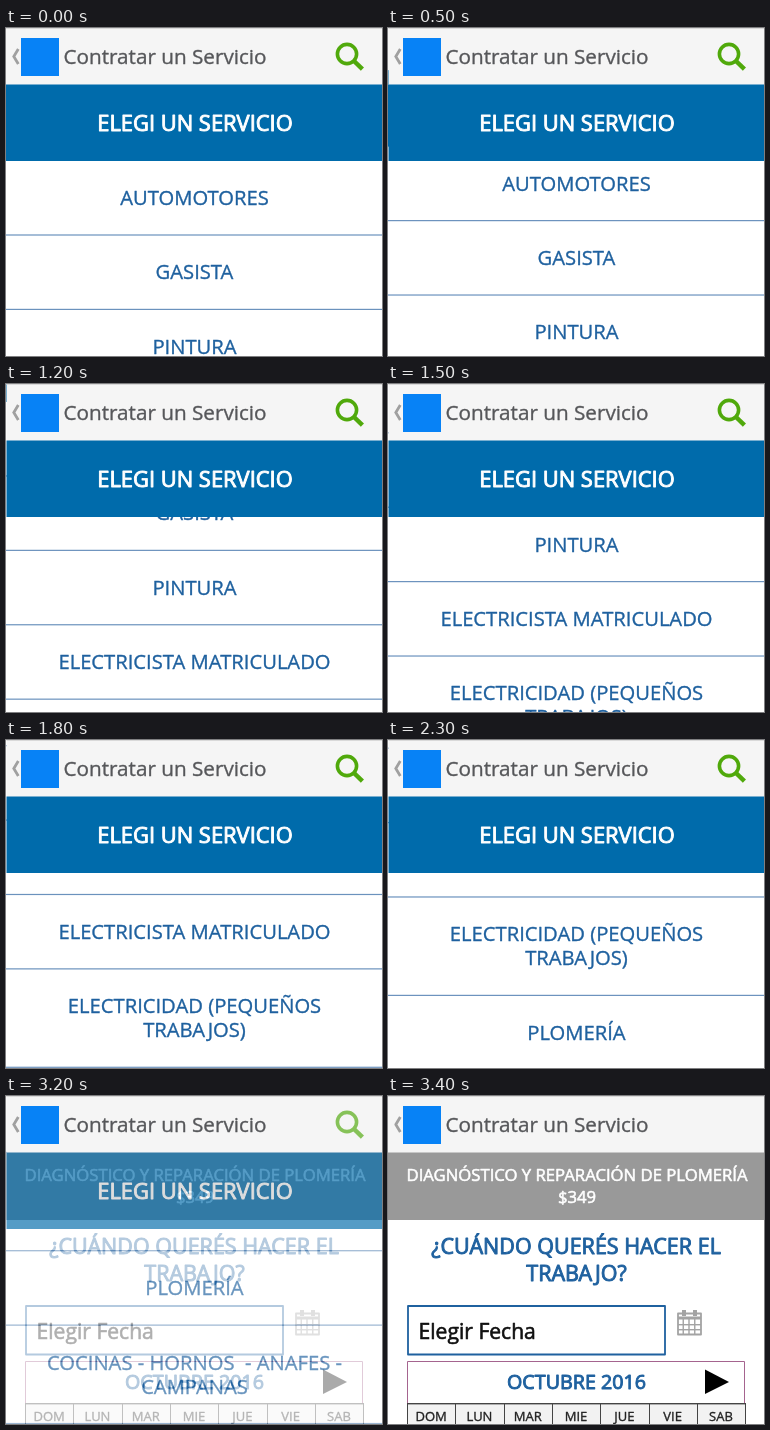
An HTML page with a canvas for the animation above (3.5 s loop, 376 px wide and 328 px high).

```html
<!DOCTYPE html>
<html lang="es">
<head>
<meta charset="utf-8">
<title>Contratar un Servicio</title>
<style>
html, body { margin: 0; width: 100%; height: 100%; overflow: hidden; background: #fff; }
canvas { display: block; }
</style>
</head>
<body>
<canvas id="stage" width="376" height="328"></canvas>
<script>
const W = 376, H = 328, LOOP = 3500, TICK = 100;
const SCROLL_START = 500, SCROLL_END = 3000, SCROLL_STEP = 14.38;
const FADE_START = 3200, FADE_STEPS = 3;
const BLUE = '#006bab', LINK = '#1f619f', RULE = '#6b92bd';
const BAR_TOP = 56.5, ROW = 74.4, LINE = 24, LIST_TOP = 132.6;
const MEDIUM = 0.35, SEMI = 0.6, BOLD = 0.95;
const SERVICES = [
  ['AUTOMOTORES'],
  ['GASISTA'],
  ['PINTURA'],
  ['ELECTRICISTA MATRICULADO'],
  ['ELECTRICIDAD (PEQUEÑOS', 'TRABAJOS)'],
  ['PLOMERÍA'],
  ['COCINAS - HORNOS\u00a0 - ANAFES -', 'CAMPANAS']
];
const DAYS = ['DOM', 'LUN', 'MAR', 'MIE', 'JUE', 'VIE', 'SAB'];

const ctx = document.getElementById('stage').getContext('2d');
const layer = document.createElement('canvas');
layer.width = W;
layer.height = H;

function box(x, y, w, h, color) {
  ctx.fillStyle = color;
  ctx.fillRect(x, y, w, h);
}

function frame(x, y, w, h, color, width) {
  ctx.strokeStyle = color;
  ctx.lineWidth = width;
  ctx.strokeRect(x, y, w, h);
}

function path(points, close) {
  ctx.beginPath();
  points.forEach(([x, y]) => ctx.lineTo(x, y));
  if (close) ctx.closePath();
}

// y is the middle of the capitals; a thin outline sets the weight
function text(str, x, y, size, color, outline, align = 'center', stretch = '') {
  const baseline = y + size * 0.357;
  ctx.font = `${stretch} ${size}px "Open Sans", "Noto Sans", sans-serif`;
  ctx.textAlign = align;
  ctx.lineJoin = 'round';
  ctx.lineWidth = outline;
  ctx.fillStyle = ctx.strokeStyle = color;
  ctx.fillText(str, x, baseline);
  ctx.strokeText(str, x, baseline);
}

function header(withSearch) {
  box(0, 0, W, 57, '#f5f5f5');
  box(0, 0, W, 1, '#d9d9d9');
  ctx.strokeStyle = '#a0a0a0';
  ctx.lineWidth = 2.8;
  path([[12.3, 21], [7.8, 28.5], [12.3, 36]]);
  ctx.stroke();
  box(15, 10, 38, 38, '#0782f6');
  text('Contratar un Servicio', 57.5, 28.5, 20.7, '#56575a', MEDIUM, 'left');
  if (withSearch) searchIcon();
}

function searchIcon() {
  ctx.strokeStyle = '#50a90b';
  ctx.lineWidth = 3.6;
  ctx.beginPath();
  ctx.arc(341, 26, 9.6, 0, Math.PI * 2);
  ctx.stroke();
  ctx.lineWidth = 4.5;
  path([[348, 33], [356.4, 41.2]]);
  ctx.stroke();
}

function banner() {
  box(0, BAR_TOP, W, 133 - BAR_TOP, BLUE);
  text('ELEGI UN SERVICIO', 189, 95, 21.9, '#fff', BOLD);
}

function services() {
  let top = LIST_TOP;
  for (const lines of SERVICES) {
    const height = ROW + (lines.length - 1) * LINE;
    const first = top + ROW / 2;
    lines.forEach((line, i) => text(line, 188.5, first + i * LINE, 20.2, LINK, MEDIUM));
    top += height;
    box(0, top - 0.6, W, 1.2, RULE);
  }
}

function listScreen(scroll) {
  box(0, 0, W, H, '#fff');
  ctx.save();
  ctx.translate(0, -scroll);
  box(0, 0, W, 57, '#f5f5f5');
  banner();
  services();
  ctx.restore();

  // the fixed bars only half cover the leftmost column while scrolling
  ctx.save();
  ctx.beginPath();
  ctx.rect(scroll ? 0.5 : 0, 0, W, H);
  ctx.clip();
  header(true);
  banner();
  ctx.restore();
}

function calendarIcon() {
  const gray = '#a3a3a3';
  frame(290, 217.5, 23, 21, gray, 1.8);
  box(290, 220.5, 23, 3, gray);
  box(294, 214, 4, 6, gray);
  box(305, 214, 4, 6, gray);
  for (let i = 1; i < 4; i++) box(288.8 + i * 5.75, 223, 1.4, 15, gray);
  for (let i = 1; i < 3; i++) box(290, 223 + i * 5, 23, 1.4, gray);
}

function calendar() {
  frame(19.5, 265.5, 337, 42, '#a5648f', 1);
  text('OCTUBRE 2016', 188.5, 285.5, 19.7, LINK, BOLD);
  ctx.fillStyle = '#000';
  path([[317, 273.5], [341, 286], [317, 298]], true);
  ctx.fill();

  const left = 19, cell = 48.3;
  box(left, 307, 338, 21, '#f2f2f2');
  box(left, 307, 338, 1.4, '#444');
  DAYS.forEach((day, i) => {
    text(day, left + (i + 0.5) * cell, 320.5, 13, '#222', MEDIUM, 'center', 'condensed');
  });
  for (let i = 0; i <= DAYS.length; i++) {
    box(Math.round(left + i * cell), 307, 1, 21, '#444');
  }
}

function formScreen() {
  box(0, 0, W, H, '#fff');
  header(false);
  box(0, BAR_TOP, W, 124 - BAR_TOP, '#999');
  text('DIAGNÓSTICO Y REPARACIÓN DE PLOMERÍA', 189, 79.5, 16.7, '#fff', SEMI);
  text('$349', 189, 101, 16.7, '#fff', SEMI);
  text('¿CUÁNDO QUERÉS HACER EL', 188, 150.5, 21.5, LINK, BOLD);
  text('TRABAJO?', 188.5, 177, 21.5, LINK, BOLD);
  frame(20, 210, 257, 48.5, LINK, 1.8);
  text('Elegir Fecha', 30.5, 235, 21.1, '#111', SEMI, 'left');
  calendarIcon();
  calendar();
}

// the list fades away over the form
function blendForm(amount) {
  layer.getContext('2d').drawImage(ctx.canvas, 0, 0);
  formScreen();
  ctx.globalAlpha = 1 - amount;
  ctx.drawImage(layer, 0, 0);
  ctx.globalAlpha = 1;
}

function draw(now) {
  const t = Math.floor((now % LOOP) / TICK) * TICK;
  const steps = t < SCROLL_START ? 0 : (Math.min(t, SCROLL_END) - SCROLL_START) / TICK + 1;
  const fade = t < FADE_START ? 0 : Math.min(1, ((t - FADE_START) / TICK + 1) / FADE_STEPS);

  if (fade === 1) {
    formScreen();
  } else {
    listScreen(steps * SCROLL_STEP);
    if (fade > 0) blendForm(fade);
  }
}

let start = null;
function tick(now) {
  if (start === null) start = now;
  draw(now - start);
  requestAnimationFrame(tick);
}
draw(0);
requestAnimationFrame(tick);
</script>
</body>
</html>
```
